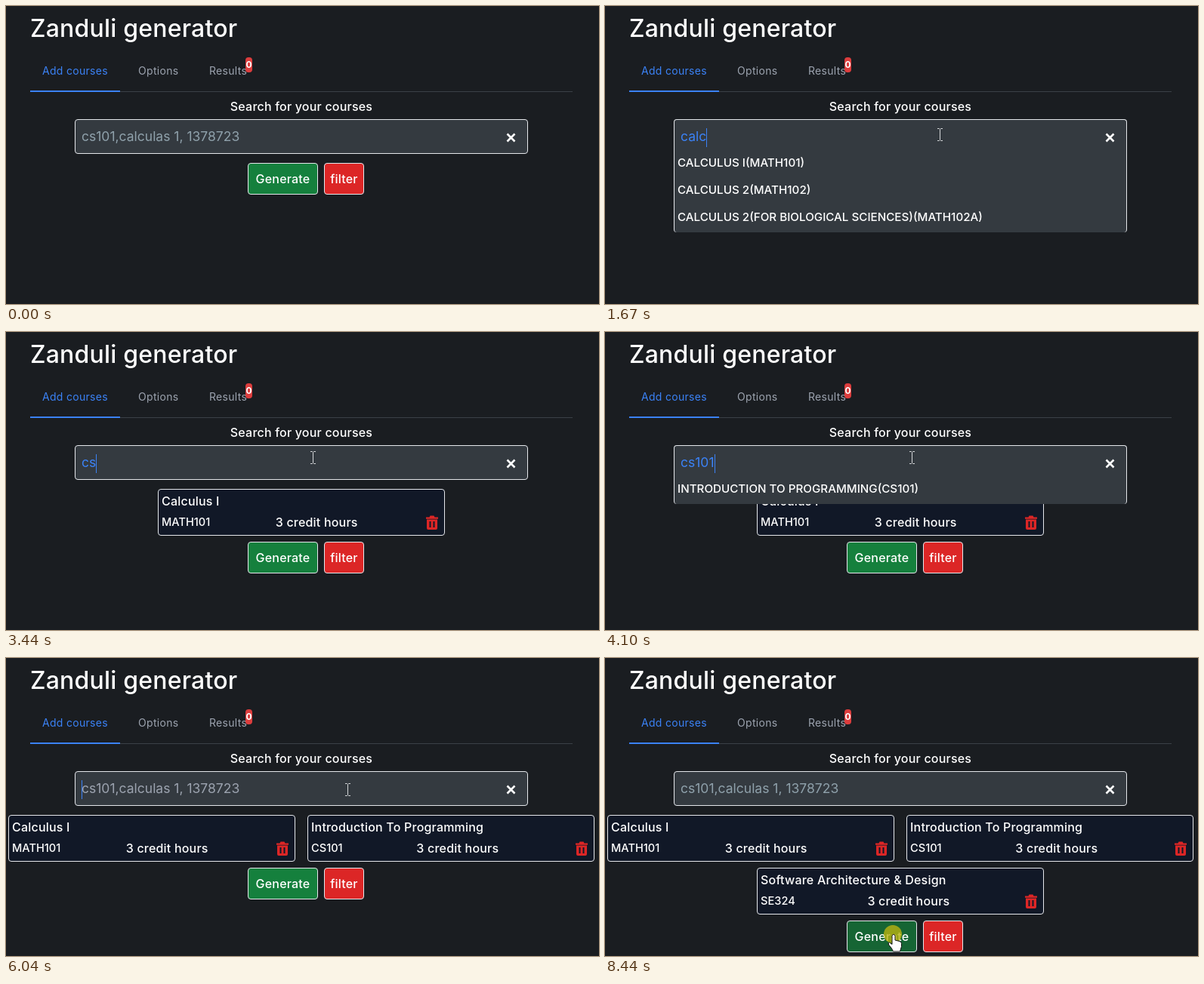
An HTML page for the animation above (8.53 s loop, 785 by 395 pixels).

```html
<!DOCTYPE html>
<html lang="en">
<head>
<meta charset="utf-8">
<title>Zanduli generator</title>
<style>
  html, body { margin: 0; width: 100%; height: 100%; overflow: hidden; background: #1a1d21; }
  * { box-sizing: border-box; }
  [hidden] { display: none !important; }
  body { position: relative; color: #fff; font: 500 16px Inter, sans-serif; letter-spacing: .2px; white-space: nowrap; }
  body > * { position: absolute; }
  h1 { left: 32px; top: 10px; margin: 0; font-size: 32px; font-weight: 500; line-height: 40px; }
  nav { left: 32px; top: 59px; width: 718px; height: 55px; border-bottom: 1px solid #3b4047; font-size: 14px; font-weight: 400; line-height: 54px; letter-spacing: .3px; color: #9ca3af; }
  nav span { position: absolute; }
  nav .active { width: 119px; height: 55px; padding-left: 16px; color: #3b82f6; border-bottom: 2px solid #3b82f6; }
  nav b { position: absolute; left: 285px; top: 9px; width: 9px; height: 20px; border-radius: 4px; background: #dc3d3d; color: #fff; font-size: 12px; line-height: 20px; text-align: center; letter-spacing: 0; }
  label { left: 0; top: 120px; width: 782px; line-height: 26px; text-align: center; }
  #search { left: 91px; top: 150px; width: 600px; height: 46px; z-index: 1; border: 1px solid #e5e7eb; border-radius: 4px; background: #343a40; }
  #search.open { height: auto; border-bottom: 0; overflow: hidden; }
  #field { height: 41px; padding-left: 8px; font-size: 17.5px; font-weight: 400; line-height: 44px; letter-spacing: 0; color: #3b82f6; }
  #hint { color: #8fa1ab; }
  #caret { display: inline-block; width: 1px; height: 25px; margin-right: -1px; vertical-align: middle; background: #3b82f6; }
  #search svg { position: absolute; left: 570px; top: 17px; }
  .row { height: 36px; padding-left: 4px; line-height: 31px; }
  .row.hover { padding-left: 5px; background: #1a1d21; }
  .caps { font-size: 15.2px; letter-spacing: 0; }
  #page { left: 0; top: 208px; width: 782px; }
  #cards { display: flex; flex-wrap: wrap; justify-content: center; column-gap: 16px; }
  .card { width: 380px; height: 62px; margin-bottom: 8px; padding: 0 4px; border: 1px solid #e5e7eb; border-radius: 4px; background: #111827; line-height: 31px; }
  .card div { display: flex; justify-content: space-between; align-items: center; line-height: 25px; }
  .card .caps { font-size: 14.6px; }
  .card svg { margin: 0 4px; }
  .button { float: left; width: 93px; height: 42px; margin-right: 8px; border: 1px solid #e5e7eb; border-radius: 4px; background: #15803d; line-height: 40px; text-align: center; }
  .button.hover { background: #166534; }
  .button.red { width: 53px; background: #dc2626; }
  #pointer { left: 0; top: 0; z-index: 2; }
</style>
</head>
<body>
<h1>Zanduli generator</h1>
<nav>
  <span class="active">Add courses</span>
  <span style="left:143px">Options</span>
  <span style="left:237px">Results</span>
  <b>0</b>
</nav>
<label>Search for your courses</label>

<div id="search">
  <div id="field"><span id="typed"></span><i id="caret"></i><span id="hint">cs101,calculas 1, 1378723</span></div>
  <svg width="13" height="13"><path d="M1.500 1.500l10 10m0-10l-10 10" stroke="#fff" stroke-width="2.600"/></svg>
  <div class="row"></div><div class="row"></div><div class="row"></div>
</div>

<div id="page">
  <div id="cards"></div>
  <div style="padding-left:320px">
    <div class="button" id="generate">Generate</div>
    <div class="button red">filter</div>
  </div>
</div>

<svg id="pointer" width="785" height="395">
  <circle id="ring" r="12" fill="#b9b312" opacity=".8"/>
  <g id="cursor" fill="#fff" stroke="#111" stroke-width="1">
    <path id="arrow" d="M0 0v16l3.800-3.500 2.600 6 2.500-1-2.600-5.800H12z"/>
    <path id="hand" d="M-1 2.500a2 2 0 0 1 4 0V8l6 1.500q2.500 .5 2.500 3v4l-2 6.500h-9l-2-4-4-5q-1-3 1-3l3.500 2.500z"/>
    <path id="beam" fill="none" stroke="#d5d7d9" d="M-3 -7.500h2.500l1 1 1-1h2.500M-3 8.500h2.500l1-1 1 1h2.500M.5-6.500v14"/>
  </g>
</svg>

<script>
const LOOP = 8530;
const $ = id => document.getElementById(id);

const courses = [
  ['Calculus I', 'MATH101', 2340],
  ['Introduction To Programming', 'CS101', 5180],
  ['Software Architecture & Design', 'SE324', 7440],
];
// Typed text: [time, text]
const typing = [
  [1270, 'c'], [1350, 'ca'], [1510, 'cal'], [1590, 'calc'], [2340, ''],
  [3360, 'c'], [3440, 'cs'], [3690, 'cs1'], [3770, 'cs10'], [3940, 'cs101'], [5180, ''],
  [6370, '1763240'], [7440, ''],
];
// Result lists: [from, to, rows]
const lists = [
  [1670, 2340, ['CALCULUS I(MATH101)', 'CALCULUS 2(MATH102)', 'CALCULUS 2(FOR BIOLOGICAL SCIENCES)(MATH102A)']],
  [4020, 5180, ['INTRODUCTION TO PROGRAMMING(CS101)']],
  [6450, 7440, ['Software Architecture & Design(SE324)']],
];
const focused = [[610, 2340], [2690, 5180], [6040, 7440]];
const caretOff = [[1090, 1270], [2940, 3360], [4350, 4930], [6860, 7370]];
const clicks = [[521, 610], [2250, 2340], [2600, 2690], [5100, 5180], [5940, 6040], [7360, 7440], [8440, LOOP]];
// Pointer moves: [first step, last step, steps, x, y]
const moves = [
  [168, 433, 4, 443, 170], [2000, 2170, 3, 375, 206], [2510, 2600, 2, 406, 166],
  [4350, 4510, 3, 417, 194], [4680, 4680, 1, 419, 196], [5350, 5790, 6, 452, 174],
  [6860, 7020, 3, 430, 196], [7520, 8090, 8, 381, 366],
];

$('cards').innerHTML = courses.map(([name, code]) => `<div class="card">${name.replace('&', '&amp;')}
  <div><span class="caps">${code}</span><span>3 credit hours</span>
  <svg width="16" height="19"><path fill="#dc2626" fill-rule="evenodd"
    d="M0 2.500h4.500l1-2h5l1 2H16v2.300H0zM1 5.500h14V17q0 2-2 2H3q-2 0-2-2zM4.500 8v8h2V8zM9.500 8v8h2V8z"/></svg></div></div>`).join('');
const cards = [...$('cards').children];
const rows = [...document.querySelectorAll('.row')];

const during = (spans, t) => spans.find(([from, to]) => t >= from && t < to);
const show = (el, on) => el.toggleAttribute('hidden', !on);

function pointerAt(t) {
  let x = 450, y = 352;
  for (const [from, to, steps, toX, toY] of moves) {
    if (t < from) break;
    const step = Math.floor((t - from) / (to - from || 1) * (steps - 1) + .001) + 1;
    const p = Math.min(1, step / steps), ease = p * p * (3 - 2 * p);
    x += (toX - x) * ease;
    y += (toY - y) * ease;
  }
  return [Math.round(x), Math.round(y)];
}

function draw(t) {
  const [x, y] = pointerAt(t);
  const text = typing.filter(([time]) => t >= time).pop()?.[1] ?? '';
  const list = during(lists, t)?.[2] ?? [];
  const count = courses.filter(course => t >= course[2]).length;

  $('typed').textContent = text;
  show($('hint'), !text);
  $('hint').style.color = during(focused, t) ? '#9ca3af' : '';
  $('caret').style.opacity = during(focused, t) && !during(caretOff, t) ? 1 : 0;

  const overRow = list.length > 0 && y >= 192;
  $('search').classList.toggle('open', list.length > 0);
  rows.forEach((row, i) => {
    const label = list[i] ?? '';
    row.textContent = label;
    show(row, label);
    row.classList.toggle('caps', label === label.toUpperCase());
    row.classList.toggle('hover', overRow && i === Math.floor((y - 192) / 36));
  });

  cards.forEach((card, i) => show(card, i < count));
  const buttonTop = 208 + 70 * Math.ceil(count / 2);
  const overButton = !list.length && x > 320 && x < 413 && y > buttonTop && y < buttonTop + 42;
  $('generate').classList.toggle('hover', t >= 80 && overButton);

  const kind = overRow || overButton ? 'hand' : y > 150 && y < 192 ? 'beam' : 'arrow';
  for (const name of ['arrow', 'hand', 'beam']) $(name).style.display = name === kind ? '' : 'none';
  $('cursor').setAttribute('transform', `translate(${x} ${y})`);
  $('ring').setAttribute('cx', x);
  $('ring').setAttribute('cy', y);
  $('ring').style.display = during(clicks, t) ? '' : 'none';
  $('pointer').style.display = t >= 80 ? '' : 'none';
}

const start = performance.now();
function tick() {
  draw((performance.now() - start) % LOOP);
  requestAnimationFrame(tick);
}
tick();
</script>
</body>
</html>
```
